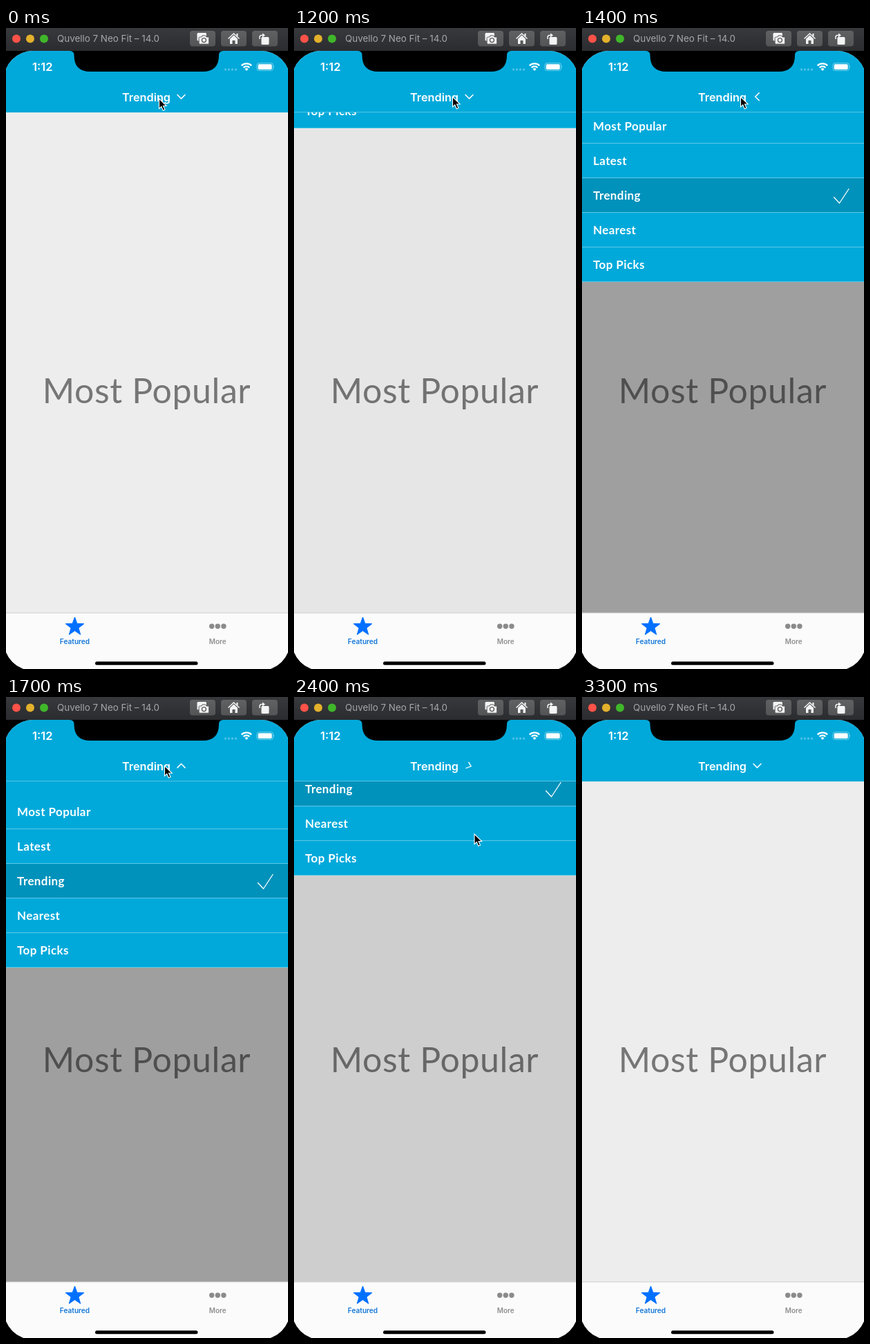
An HTML page for the animation above (3400 ms loop, 408 by 926 pixels).

```html
<!DOCTYPE html>
<html lang="en">
<head>
<meta charset="utf-8">
<title>Dropdown menu</title>
<style>
  html, body { margin: 0; width: 100%; height: 100%; overflow: hidden; background: #000; }
  svg { display: block; width: 408px; height: 926px; }
  text { white-space: pre; }
  .ui { font-family: Inter, "Liberation Sans", sans-serif; }
  .soft { font-family: Lato, "Open Sans", sans-serif; }
  .semi { font-weight: 600; }
  .mid { text-anchor: middle; }
  .line { fill: none; stroke-linecap: round; stroke-linejoin: round; }
</style>
</head>
<body>
<svg viewBox="0 0 408 926">
  <defs>
    <linearGradient id="bar" x1="0" y1="0" x2="0" y2="1">
      <stop offset="0" stop-color="#38393c"/>
      <stop offset="1" stop-color="#2b2c2f"/>
    </linearGradient>
    <linearGradient id="key" x1="0" y1="0" x2="0" y2="1">
      <stop offset="0" stop-color="#606163"/>
      <stop offset="1" stop-color="#535456"/>
    </linearGradient>
    <clipPath id="screen"><rect x="-3" y="33" width="414" height="895" rx="42"/></clipPath>
    <clipPath id="body"><rect y="122" width="408" height="723"/></clipPath>
  </defs>

  <rect width="408" height="926"/>

  <!-- window bar -->
  <rect width="408" height="33" fill="url(#bar)"/>
  <circle cx="15" cy="15.5" r="6" fill="#ff5249"/>
  <circle cx="35" cy="15.5" r="6" fill="#e3b12c"/>
  <circle cx="55" cy="15.5" r="6" fill="#40b72b"/>
  <text class="ui" x="74" y="20.3" font-size="13.4" fill="#a6a7a9">Quvello 7 Neo Fit – 14.0</text>
  <g fill="url(#key)">
    <rect x="266" y="4" width="37" height="22.5" rx="4"/>
    <rect x="311" y="4" width="37" height="22.5" rx="4"/>
    <rect x="356" y="4" width="37" height="22.5" rx="4"/>
  </g>
  <g fill="#f4f4f4">
    <rect x="276.5" y="7" width="13.5" height="11.5" rx="1.5"/>
    <path d="M280.5 13h2.3l1.2-2h4.8l1.2 2h2.3q1.4 0 1.4 1.4v7.4q0 1.4-1.4 1.4h-11.8q-1.4 0-1.4-1.4v-7.4q0-1.4 1.4-1.4z" stroke="#58595b"/>
    <circle cx="286.4" cy="17.6" r="3" fill="none" stroke="#58595b" stroke-width="1.3"/>
    <path d="M329.5 7l8.5 8-1 1-7.5-7-7.5 7-1-1z"/>
    <path d="M329.5 10.5l5.5 5.2v7.3h-3.5v-5h-4v5h-3.5v-7.3z"/>
    <rect x="333.5" y="8" width="2" height="4"/>
    <rect x="369.5" y="13" width="11" height="11" rx="1.5"/>
    <path d="M367 16v-2.5q0-3 3-3h2" fill="none" stroke="#f4f4f4" stroke-width="1.5"/>
    <path d="M371 7.5l4 3-4 3z"/>
  </g>

  <g clip-path="url(#screen)">
    <rect y="33" width="408" height="893" fill="#ededed"/>
    <text class="soft mid" x="203.5" y="542" font-size="50" letter-spacing=".6" fill="#767676">Most Popular</text>
    <rect id="dim" y="122" width="408" height="723" opacity="0"/>
    <g clip-path="url(#body)"><g id="menu"></g></g>

    <!-- navigation header -->
    <rect y="33" width="408" height="89" fill="#00a9da"/>
    <rect id="edge" y="121" width="408" height="1" fill="#55c5e6"/>
    <path d="M92 33q6.5 0 6.5 6.5q0 23.5 23.5 23.5h162.500q23.5 0 23.5-23.5q0-6.5 6.5-6.5z"/>
    <g fill="#fff">
      <text class="ui semi" x="38" y="61.5" font-size="16.5">1:12</text>
      <text class="ui semi mid" x="203" y="105.5" font-size="16.3">Trending</text>
      <g opacity=".3">
        <circle cx="317.5" cy="60" r="1.7"/><circle cx="322.5" cy="60" r="1.7"/>
        <circle cx="327.5" cy="60" r="1.7"/><circle cx="332.5" cy="60" r="1.7"/>
      </g>
      <g fill="none" stroke="#fff" stroke-width="2.2">
        <path d="M340.8 54.4a10.2 10.2 0 0 1 14.4 0"/>
        <path d="M343.6 57.3a6.2 6.2 0 0 1 8.8 0"/>
      </g>
      <path d="M348 62l-2.5-2.7a3.5 3.5 0 0 1 5 0z"/>
      <rect x="363" y="50.7" width="23.5" height="10.8" rx="3" fill="none" stroke="#fff" stroke-opacity=".45"/>
      <rect x="364.7" y="52.3" width="20" height="7.6" rx="1.7"/>
      <path d="M387.6 54.3q1.6 1.8 0 3.6z" opacity=".5"/>
    </g>
    <path id="arrow" class="line" d="M-5.5-2.8L0 2.8L5.5-2.8" stroke="#fff" stroke-width="1.5"/>

    <!-- tab bar -->
    <rect y="845" width="408" height="81" fill="#fbfbfb"/>
    <rect y="844.5" width="408" height="1" fill="#cfcfcf"/>
    <path id="star" fill="#0070ff" stroke="#0070ff" stroke-linejoin="round"/>
    <g fill="#8b8b8b">
      <circle cx="297.7" cy="864.3" r="3.7"/><circle cx="306.3" cy="864.3" r="3.7"/><circle cx="314.9" cy="864.3" r="3.7"/>
    </g>
    <text class="ui semi mid" x="99.5" y="890.3" font-size="10.1" fill="#1477d8">Featured</text>
    <text class="ui semi mid" x="306.3" y="890.3" font-size="10" fill="#8f8f8f">More</text>
    <rect x="129" y="915.3" width="148.5" height="5" rx="2.5"/>
  </g>

  <path id="cursor" d="M0 0v14.6l3.3-3.1 2.5 5.7 2.7-1.2-2.5-5.5h4.7z" stroke="#fff" stroke-width="1.1"/>
</svg>

<script>
const LOOP = 3400, STEP = 100;
const OPEN_AT = 1180, CLOSE_AT = 2206, CLOSE_MS = 380;
const ROW = 50, SHUT = 137, SPAN = 250;
const BLUE = '#00a9da', DARK = '#0092bb', RULE = '#5dc8e8';
const items = ['Most Popular', 'Latest', 'Trending', 'Nearest', 'Top Picks'];

// time, x, y of the pointer tip
const path = [
  [0, 221.5, 102], [300, 226, 100], [600, 229.5, 99.5], [2200, 229.5, 99.5],
  [2300, 238, 118], [2400, 261, 198], [2500, 287, 496.5],
  [2600, 300, 720], [2700, 305, 890], [2800, 308, 940]
];

const $ = id => document.getElementById(id);

function add(parent, tag, attrs, text) {
  const el = document.createElementNS('http://www.w3.org/2000/svg', tag);
  for (const k in attrs) el.setAttribute(k, attrs[k]);
  if (text) el.textContent = text;
  parent.append(el);
}

// cubic-bezier(.42, 0, .58, 1)
function ease(x) {
  if (x <= 0) return 0;
  if (x >= 1) return 1;
  let lo = 0, hi = 1;
  for (let i = 0; i < 24; i++) {
    const u = (lo + hi) / 2, v = 1 - u;
    if (3 * v * v * u * .42 + 3 * v * u * u * .58 + u ** 3 < x) lo = u; else hi = u;
  }
  return lo * lo * (3 - 2 * lo);
}

function spring(ms) {
  if (ms <= 0) return 0;
  const z = .7, w = .01235, d = Math.sqrt(1 - z * z);
  const a = w * d * ms;
  return 1 - Math.exp(-z * w * ms) * (Math.cos(a) + z / d * Math.sin(a));
}

function pointer(t) {
  const i = path.findIndex(p => p[0] > t);
  if (i < 0) return null;
  const [t0, x0, y0] = path[i - 1], [t1, x1, y1] = path[i];
  const k = (t - t0) / (t1 - t0);
  return [x0 + (x1 - x0) * k, y0 + (y1 - y0) * k];
}

function build() {
  const menu = $('menu');
  add(menu, 'rect', { y: -300, width: 408, height: 300 + SPAN, fill: BLUE });
  items.forEach((name, i) => {
    const y = i * ROW;
    if (name === 'Trending') {
      add(menu, 'rect', { y, width: 408, height: ROW, fill: DARK });
      add(menu, 'path', {
        class: 'line', d: `M364.5 ${y + 28}l8 8.5l13.5-20.5`,
        stroke: '#fff', 'stroke-width': 1.3
      });
    }
    add(menu, 'text', {
      class: 'soft', x: 16, y: y + 31, fill: '#fff',
      'font-size': 17, 'font-weight': 700, 'letter-spacing': .4
    }, name);
  });
  items.forEach((_, i) =>
    add(menu, 'rect', { y: (i + 1) * ROW - .5, width: 408, height: 1, fill: RULE }));
  const pts = Array.from({ length: 10 }, (_, i) => {
    const r = i % 2 ? 5.7 : 14, a = (i * 36 - 90) * Math.PI / 180;
    return (99.5 + r * Math.cos(a)).toFixed(2) + ' ' + (865 + r * Math.sin(a)).toFixed(2);
  });
  $('star').setAttribute('d', 'M' + pts.join('L') + 'z');
}

function draw(t) {
  const shut = ease((t - CLOSE_AT) / CLOSE_MS);
  const fade = ease((t - 2137) / 465);
  const drop = spring(t - OPEN_AT) * (1 - shut);
  const show = t > OPEN_AT && shut < 1 ? 'visible' : 'hidden';

  $('menu').setAttribute('visibility', show);
  $('edge').setAttribute('visibility', show);
  // rules are one pixel thick and sit on whole pixels
  const top = Math.round(SHUT + SPAN * (drop - 1)) + .5;
  $('menu').setAttribute('transform', `translate(0 ${top})`);
  $('dim').setAttribute('opacity', .33 * ease((t - 1145) / 255) * (1 - fade));

  const back = shut > 0 ? fade : 0;
  const turn = 180 * (ease((t - OPEN_AT) / 440) + back);
  const flat = back > 0 && back < 1 ? .82 : 1;
  $('arrow').setAttribute('transform', `translate(253.5 99.3) scale(1 ${flat}) rotate(${turn})`);

  const at = pointer(t);
  $('cursor').setAttribute('visibility', at ? 'visible' : 'hidden');
  if (at) $('cursor').setAttribute('transform', `translate(${at})`);
}

build();
const start = performance.now();
function tick() {
  const t = (performance.now() - start) % LOOP;
  draw(Math.floor(t / STEP) * STEP);
  requestAnimationFrame(tick);
}
tick();
</script>
</body>
</html>
```
